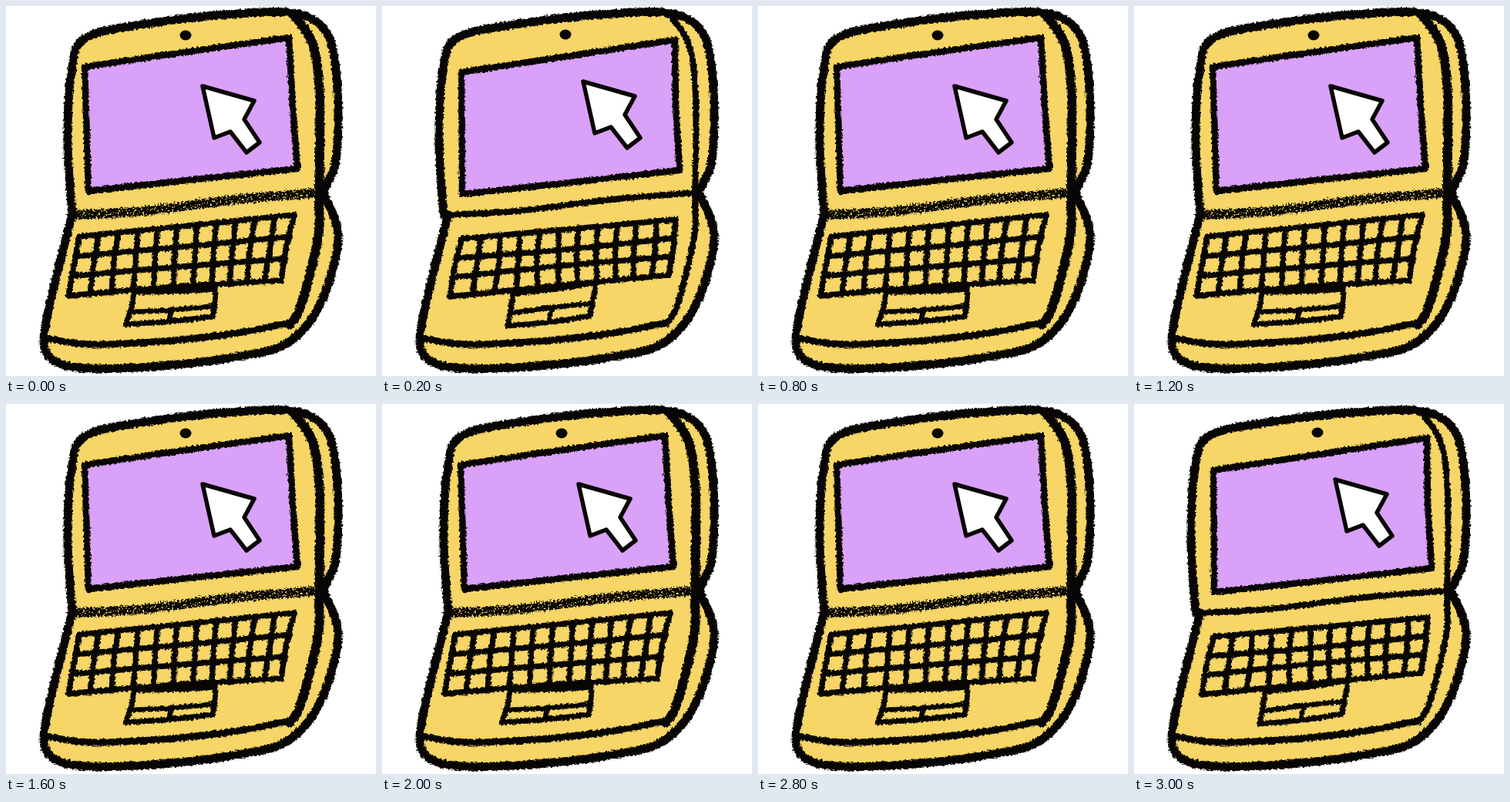
These frames come from a looping animation (480 by 480 pixels, 3200 ms). An HTML page:

```html
<!DOCTYPE html>
<html lang="en">
<head>
<meta charset="utf-8">
<title>Laptop doodle</title>
<style>
  html, body { margin: 0; width: 100%; height: 100%; overflow: hidden; background: #fff; }
  svg { display: block; width: 100vw; height: 100vh; }
</style>
</head>
<body>
<svg id="stage" viewBox="0 0 480 480">
  <defs>
    <filter id="crayon" filterUnits="userSpaceOnUse" x="0" y="0" width="480" height="480" color-interpolation-filters="sRGB">
      <feTurbulence type="fractalNoise" baseFrequency=".32" numOctaves="2" seed="4" result="noise"/>
      <feDisplacementMap in="SourceGraphic" in2="noise" scale="5" xChannelSelector="R" yChannelSelector="G"/>
    </filter>
    <filter id="grain" filterUnits="userSpaceOnUse" x="0" y="0" width="480" height="480" color-interpolation-filters="sRGB">
      <feTurbulence type="fractalNoise" baseFrequency=".4" numOctaves="2" seed="9" result="noise"/>
      <feColorMatrix in="noise" values="0 0 0 0 0  0 0 0 0 0  0 0 0 0 0  9 0 0 0 -2.7" result="specks"/>
      <feDisplacementMap in="SourceGraphic" in2="noise" scale="8" xChannelSelector="R" yChannelSelector="G" result="rough"/>
      <feComposite in="rough" in2="specks" operator="in"/>
    </filter>
  </defs>
</svg>
<script>
const NS = 'http://www.w3.org/2000/svg';
const STEP = 200, LOOP = 3200;
const YELLOW = '#f7d566', PURPLE = '#d9a1f8', INK = '#080604';
const COLUMNS = 11, ROWS = 3;

const points = text => text.split(' ').map(pair => pair.split(',').map(Number));

// Key points shared by both drawings.
const LID = points('86,270 80,180 85,85 104,41 190,22 300,10 378,10 418,38 430,110 428,200 411,241');
const BASE = points('86,271 63,360 49,432 62,460 105,470 200,467 300,455 365,437 408,386 431,300 411,242');
const SPINE = points('372,10 398,50 407,120 406,250 405,300 383,388 368,413');
const FRONT = points('52,431 110,439 215,434 300,424 369,411');
const HINGE = points('86,271 180,266 300,251 412,242');
const CURSOR = points('255,104 322,123 309,147 329,177 312,190 291,163 270,171');

// Quads list their corners clockwise from the top left.
const poses = [
  {
    lean: 0, spineWidth: 12, hingeWidth: 12, hingeFilter: 'grain', camera: [233, 38], cursorShift: [0, 0],
    screen: points('102,79 367,41 378,211 107,240'),
    board: points('95,299 374,271 357,356 81,376'),
    pad: points('166,371 271,367 268,403 155,413')
  },
  {
    lean: -6, spineWidth: 8, hingeWidth: 8, hingeFilter: 'crayon', camera: [238, 37], cursorShift: [6, -6],
    screen: points('103,86 380,44 386,213 104,244'),
    board: points('103,302 381,277 372,349 88,377'),
    pad: points('170,373 277,359 270,402 163,415')
  }
];

function randomizer(seed) {
  return () => {
    seed = (seed * 16807) % 2147483647;
    return seed / 2147483647 - 0.5;
  };
}

const mix = (a, b, t) => a.map((v, k) => v + (b[k] - v) * t);
const inQuad = ([tl, tr, br, bl], u, v) => mix(mix(tl, tr, u), mix(bl, br, u), v);

// Catmull-Rom spline through the points, written as cubic segments.
function smooth(p) {
  let d = 'M' + p[0];
  for (let i = 0; i < p.length - 1; i++) {
    const a = p[i - 1] || p[i], b = p[i], c = p[i + 1], e = p[i + 2] || c;
    const c1 = b.map((v, k) => v + (c[k] - a[k]) / 6);
    const c2 = c.map((v, k) => v - (e[k] - b[k]) / 6);
    d += `C${c1} ${c2} ${c}`;
  }
  return d;
}

function add(parent, tag, attrs) {
  const el = document.createElementNS(NS, tag);
  for (const name in attrs) el.setAttribute(name, attrs[name]);
  return parent.appendChild(el);
}

function drawLaptop(pose, index) {
  const random = randomizer(index + 11);
  const root = add(document.getElementById('stage'), 'g', { 'stroke-linecap': 'round', 'stroke-linejoin': 'round' });
  const fills = add(root, 'g', { fill: YELLOW, stroke: YELLOW, 'stroke-width': 5 });
  const layer = filter => add(root, 'g', { fill: 'none', stroke: INK, filter: `url(#${filter})` });
  const ink = layer('crayon');

  const curve = (p, width, parent = ink) => add(parent, 'path', { d: smooth(p), 'stroke-width': width });
  const stroke = (a, b, width) => {
    const middle = mix(a, b, 0.5).map(v => v + random() * 4);
    curve([a, middle, b], width);
  };
  const frame = (quad, width) => quad.forEach((corner, i) => stroke(corner, quad[(i + 1) % 4], width));
  const leaned = p => p.map(([x, y]) => [x + pose.lean * (430 - x) / 350, y]);

  const lid = leaned(LID);
  for (const shape of [lid, BASE]) add(fills, 'path', { d: smooth(shape) + 'Z' });
  add(fills, 'polygon', { points: pose.screen.join(' '), fill: PURPLE, stroke: 'none' });

  curve(lid, 11);
  curve(BASE, 11);
  curve(SPINE, pose.spineWidth);
  curve(FRONT, 9);
  curve(leaned(HINGE), pose.hingeWidth, layer(pose.hingeFilter));
  frame(pose.screen, 8.5);

  // Columns drift right towards the middle of the bottom edge.
  const key = (u, v) => inQuad(pose.board, u + 0.04 * v * Math.sin(Math.PI * u), v);
  for (let c = 0; c <= COLUMNS; c++) stroke(key(c / COLUMNS, 0), key(c / COLUMNS, 1), 7.5);
  for (let r = 0; r <= ROWS; r++) stroke(key(0, r / ROWS), key(1, r / ROWS), 7.5);

  const pad = (u, v) => inQuad(pose.pad, u, v);
  frame(pose.pad, 7);
  stroke(pad(0, 0.62), pad(1, 0.62), 6.5);
  stroke(pad(0.52, 0.62), pad(0.5, 1), 6.5);

  const [cx, cy] = pose.camera;
  add(root, 'ellipse', { cx, cy, rx: 7.5, ry: 6.5, fill: INK });
  add(root, 'polygon', {
    points: CURSOR.join(' '), transform: `translate(${pose.cursorShift})`,
    fill: '#fff', stroke: INK, 'stroke-width': 5.5
  });
  return root;
}

const drawings = poses.map(drawLaptop);

function render(time) {
  const current = Math.floor((time % LOOP) / STEP) % drawings.length;
  drawings.forEach((g, i) => g.setAttribute('display', i === current ? 'inline' : 'none'));
}

const start = performance.now();
function tick() {
  render(performance.now() - start);
  requestAnimationFrame(tick);
}
tick();
</script>
</body>
</html>
```
